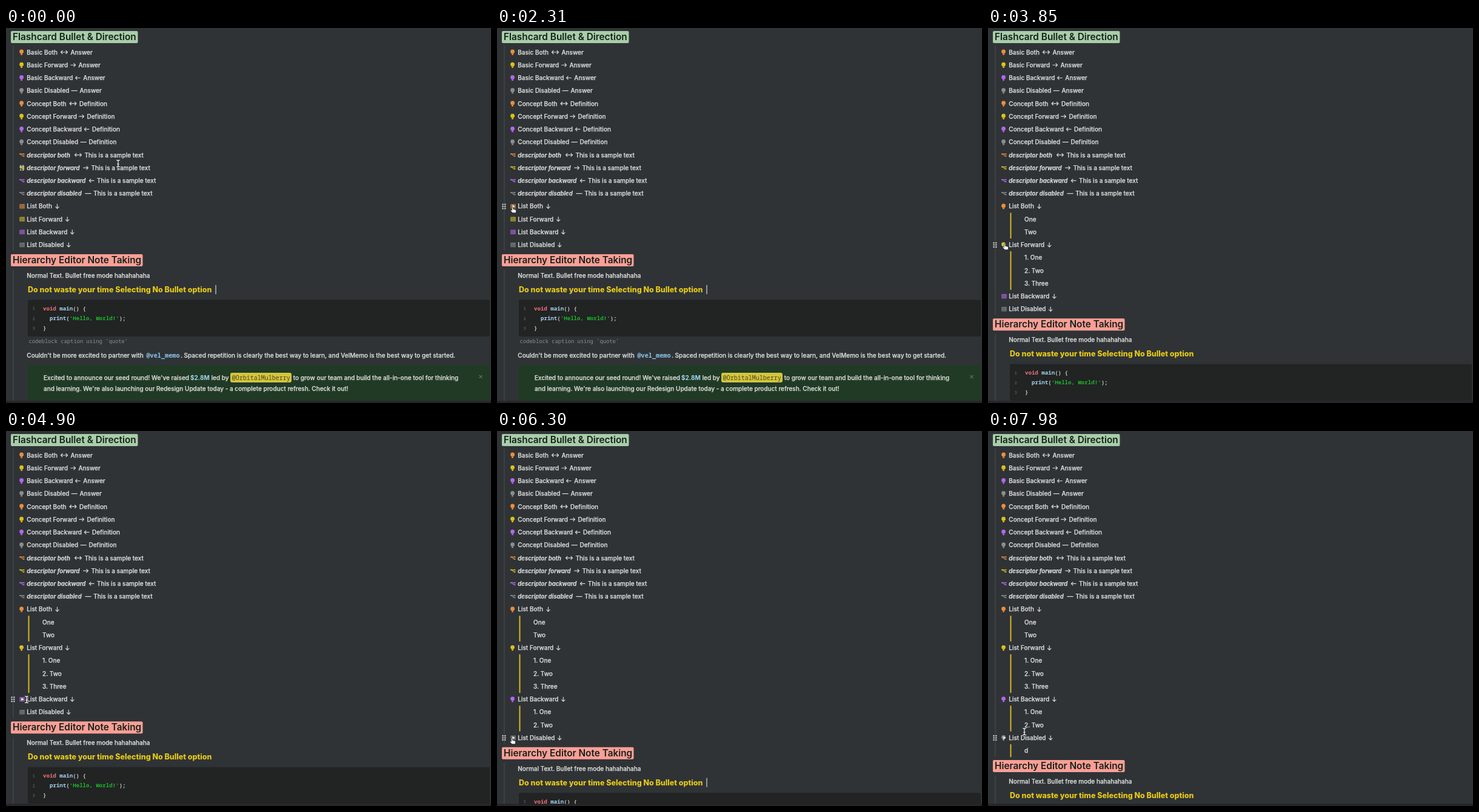
An HTML page that plays this animation: 800 px wide and 620 px high, repeating every 8 s.

```html
<!DOCTYPE html>
<html lang="en">
<head>
<meta charset="utf-8">
<title>Outline editor</title>
<style>
  html, body { margin: 0; width: 100%; height: 100%; overflow: hidden; background: #2f3336; }
  svg { display: block; width: 800px; height: 620px; }
  text { font: 500 10px Inter, sans-serif; fill: #dcdedc; stroke: #dcdedc; stroke-width: .25px; white-space: pre; }
  .term { font-size: 9.65px; font-style: italic; font-weight: 600; }
  .heading { font-size: 15.35px; font-weight: 600; fill: #16201a; stroke: none; }
  .loud { font-size: 12.5px; font-weight: 800; fill: #e6c916; stroke: none; }
  .code { font: 600 9.1px "Noto Sans Mono", monospace; fill: #c3c6c3; stroke: none; }
  .code .type { fill: #f0737c; font-weight: 700; }
  .code .call { fill: #a4d4f2; font-weight: 700; }
  .code .str { fill: #1db52c; }
  .num { font-size: 7.5px; fill: #505354; }
  .caption { font-size: 8.8px; font-weight: 500; fill: #8b8e8d; }
  .mention { font: 600 10.2px "Noto Sans Mono", monospace; fill: #8cc6ea; stroke: none; }
  .sum { font-weight: 700; fill: #a0d4f0; stroke: none; }
  .badge { font: 500 10px "Noto Sans Mono", monospace; fill: #4d491c; stroke: none; }
  .arrow { fill: none; stroke: #d4d6d4; stroke-width: 1.2; stroke-linecap: round; stroke-linejoin: round; }
  .guide { fill: #4a4f51; }
  .beam { fill: none; stroke: #dfe1df; stroke-width: 1.4; }
  .beam.edge { stroke: #26292b; stroke-width: 3; }
</style>
</head>
<body>
<svg id="stage" viewBox="0 0 800 620"></svg>
<script>
const LOOP = 8000, PITCH = 21.24, FIRST = 40;
const ORANGE = '#ee8d3a', YELLOW = '#dcc118', PURPLE = '#b566ee', GREY = '#8b8e8e';
const COLORS = [ORANGE, YELLOW, PURPLE, GREY];
const MODES = ['Both', 'Forward', 'Backward', 'Disabled'];

// Each family: label, reply, and the reply's x for every mode.
const FAMILIES = [
  { label: 'Basic', reply: 'Answer', at: [106.5, 119.5, 127.3, 121.5] },
  { label: 'Concept', reply: 'Definition', at: [121, 133.5, 142, 136.5] },
  { label: 'descriptor', reply: 'This is a sample text', at: [129.5, 140.5, 150, 144.3], term: true }
];
const LISTS = [
  { arrowX: 84.5, opens: 2730, items: ['One', 'Two'] },
  { arrowX: 101.2, opens: 3570, items: ['1. One', '2. Two', '3. Three'] },
  { arrowX: 109.3, opens: 5320, items: ['1. One', '2. Two'] },
  { arrowX: 103.3, opens: 7000, items: ['d'] }
];
// Pointer stops: time, x, y.
const STOPS = [
  [0, 185, 224], [150, 185, 224], [900, 9, 357], [1450, 9, 357],
  [2150, 27, 301], [2850, 27, 301], [3430, 29, 362], [4150, 29, 362],
  [4800, 34, 444], [4950, 34, 444], [5200, 27, 447], [5550, 27, 447],
  [6200, 26, 513], [7250, 26, 513], [7850, 60, 497], [LOOP, 60, 497]
];

const text = (x, y, str, cls = '') => `<text x="${x}" y="${y}" class="${cls}">${str}</text>`;
const rect = (x, y, w, h, fill, extra = '') =>
  `<rect x="${x}" y="${y}" width="${w}" height="${h}" fill="${fill}" ${extra}/>`;
const span = (cls, str) => `<tspan class="${cls}">${str}</tspan>`;
const group = (id, body, y = 0) => `<g id="${id}" transform="translate(0 ${y})">${body}</g>`;

const bulb = c => `<circle cx="25.6" cy="-1" r="3.4" fill="${c}"/>
  <path d="M24.1 1.6h3v2.6q-1.5 1-3 0z" fill="${c}"/>
  <path d="M24.1 2.7h3" stroke="#2f3336" stroke-width=".6" opacity=".6"/>`;
const branch = c => `<path d="M23.5-1.5h6M25.6-1.5q.2 3.3 3.6 3.3" fill="none" stroke="${c}" stroke-width="1.1"/>
  ${rect(22.3, -2.6, 2.2, 2.2, c)}${rect(28.2, -2.4, 2.2, 1.8, c)}${rect(28.2, .9, 2.2, 1.8, c)}`;
const sheet = c => rect(22.4, -3.7, 8.4, 7.4, c, 'opacity=".8"') +
  `<path d="M25-1.7h5.4M25 .3h5.4M25 2.3h5.4M24.3-3.7v7.4" stroke="#44484a" stroke-width=".7"/>`;

function link(mode, x) {
  const shapes = [
    `M${x - 16} 0h11m-2.5-2.5l2.5 2.5-2.5 2.5M${x - 13.5} -2.5l-2.5 2.5 2.5 2.5`,
    `M${x - 12.7} 0h7.7m-2.6-2.6l2.6 2.6-2.6 2.6`,
    `M${x - 5} 0h-7.7m2.6-2.6l-2.6 2.6 2.6 2.6`,
    `M${x - 13.4} 0h9.2`
  ];
  return `<path class="arrow" d="${shapes[mode]}"/>`;
}

function cardRow(family, mode, index) {
  const { label, reply, at, term } = family;
  const name = label + ' ' + (term ? MODES[mode].toLowerCase() : MODES[mode]);
  return group('card' + index,
    (term ? branch : bulb)(COLORS[mode]) + text(34.3, 3.6, name, term ? 'term' : '') +
    link(mode, at[mode]) + text(at[mode], 3.6, reply), FIRST + index * PITCH);
}

function listRow(list, i) {
  const kids = list.items.map((s, n) => text(60, (n + 1) * PITCH + 3.6, s)).join('');
  return group('list' + i,
    `<g id="shut${i}">${sheet(COLORS[i])}</g>
     <g id="open${i}">${bulb(COLORS[i])}${kids}
       ${rect(36.5, PITCH / 2, 2, list.items.length * PITCH, '#d8b820')}</g>
     <path id="play${i}" d="M25.2-2.6l4.6 2.6-4.6 2.6z" fill="#e8e8e8"/>` +
    text(34.3, 3.6, 'List ' + MODES[i]) +
    `<path class="arrow" d="M${list.arrowX}-3.5v7m-2.7-2.7l2.7 2.7 2.7-2.7"/>`);
}

const title = (y, fill, w, str) =>
  rect(8, y - 10, w, 20, fill, 'rx="2"') + text(11, y + 5.2, str, 'heading');

const lower = title(384, '#fa9f96', 217.5, 'Hierarchy Editor Note Taking') +
  rect(11.5, 400, 1, 300, '#4a4f51') +
  text(34.3, 412.9, 'Normal Text. Bullet free mode hahahahaha') +
  text(36, 437, 'Do not waste your time Selecting No Bullet option', 'loud') +
  rect(345.5, 425, 1.1, 15, '#e4e6e4', 'id="caret"') +
  rect(36, 449.5, 762, 60.5, '#222323', 'rx="2"') +
  [1, 2, 3].map(n => text(43.5, 450.3 + n * 16.1, n, 'code num')).join('') +
  text(61, 467, span('type', 'void') + ' ' + span('call', 'main') + '() {', 'code') +
  text(72, 483, span('call', 'print') + '(' + span('str', "'Hello, World!'") + ');', 'code') +
  text(61, 499, '}', 'code') +
  text(37.5, 521, "codeblock caption using 'quote'", 'code caption') +
  text(34.3, 545.1, "Couldn't be more excited to partner with") +
  text(231.5, 545.1, '@vel_memo', 'mention') +
  text(288, 545.1, '. Spaced repetition is clearly the best way to learn, and VelMemo is the best way to get started.') +
  rect(36, 557, 762, 64, '#213a25', 'rx="2"') +
  text(62, 581.6, "Excited to announce our seed round! We've raised") +
  text(304, 581.6, '$2.8M', 'sum') + text(338.5, 581.6, 'led by') +
  rect(370.5, 570.5, 100, 15, '#d5c53c', 'rx="2" stroke="#e2d65a" stroke-width=".8"') +
  text(372.7, 581.6, '@OrbitalMulberry', 'badge') +
  text(473.7, 581.6, 'to grow our team and build the all-in-one tool for thinking') +
  text(62, 600, "and learning. We're also launching our Redesign Update today - a complete product refresh. Check it out!") +
  '<path d="M780.5 574l5 5m0-5l-5 5" stroke="#7f8c80" fill="none"/>';

const dots = [0, 1, 2, 3, 4, 5].map(n =>
  rect(-3 + (n % 2) * 3.8, -4.4 + (n >> 1) * 3.4, 2.2, 2.2, '#cdd0cd')).join('');

const cards = FAMILIES.flatMap((f, k) => MODES.map((_, m) => cardRow(f, m, k * 4 + m))).join('');

const beam = 'M-2.8-5.5q2.8 0 2.8 1.8v7.4q0 1.8-2.8 1.8M2.8-5.5q-2.8 0-2.8 1.8M0 3.7q0 1.8 2.8 1.8M-1.6 1h3.2';

document.getElementById('stage').innerHTML =
  rect(0, 0, 800, 620, '#2f3336') +
  title(15, '#a8cea9', 209.5, 'Flashcard Bullet &amp; Direction') +
  '<rect id="trunk" class="guide" x="11.5" y="29" width="1"/>' +
  cards + LISTS.map(listRow).join('') + group('lower', lower) +
  rect(0, 616.5, 800, 3.5, '#282429') +
  group('handle', dots) +
  `<g id="hand"><path d="M-2.6-5q1.2-1 1.9.4l.6 3 3.3.7q1.7.4 1.5 2L4.2 4.8H-1.2L-4.8 1q-.3-1.5 1.2-1.2l1 .6z"
     fill="#f4f4f4" stroke="#1d1f20" stroke-width=".8"/></g>` +
  `<g id="beam"><path class="beam edge" d="${beam}"/><path class="beam" d="${beam}"/></g>`;

const el = id => document.getElementById(id);
const show = (id, on) => { el(id).style.display = on ? '' : 'none'; };
const move = (id, x, y) => el(id).setAttribute('transform', `translate(${x} ${y})`);

function pointerAt(t) {
  const i = STOPS.findIndex(s => s[0] > t);
  const [t0, x0, y0] = STOPS[i - 1], [t1, x1, y1] = STOPS[i];
  const p = (t - t0) / (t1 - t0), e = p * p * (3 - 2 * p);
  return [x0 + (x1 - x0) * e, y0 + (y1 - y0) * e];
}

function draw(t) {
  const [px, py] = pointerAt(t);
  const inside = px >= 13;
  const hovers = y => inside && py >= y - PITCH / 2 && py < y + PITCH / 2;
  let handle = null, row = 12;

  for (let i = 0; i < 12; i++) {
    const y = FIRST + i * PITCH;
    if (hovers(y)) handle = [26.3, y];
  }
  LISTS.forEach((list, i) => {
    const y = FIRST + row * PITCH, open = t >= list.opens, over = hovers(y);
    move('list' + i, 0, y);
    show('open' + i, open);
    show('shut' + i, !open);
    show('play' + i, over);
    if (over) handle = [11.5, y];
    row += 1 + (open ? list.items.length : 0);
  });

  const shift = (row - 16) * PITCH;
  move('lower', 0, shift);
  el('trunk').setAttribute('height', 339 + shift);
  const blink = t % 1060;
  show('caret', blink < 450 || blink > 920);

  show('handle', handle);
  if (handle) move('handle', ...handle);
  const hand = px < 32;
  show('hand', hand);
  show('beam', !hand);
  move(hand ? 'hand' : 'beam', px, py);
}

const start = performance.now();
function tick() {
  draw((performance.now() - start) % LOOP);
  requestAnimationFrame(tick);
}
tick();
</script>
</body>
</html>
```
